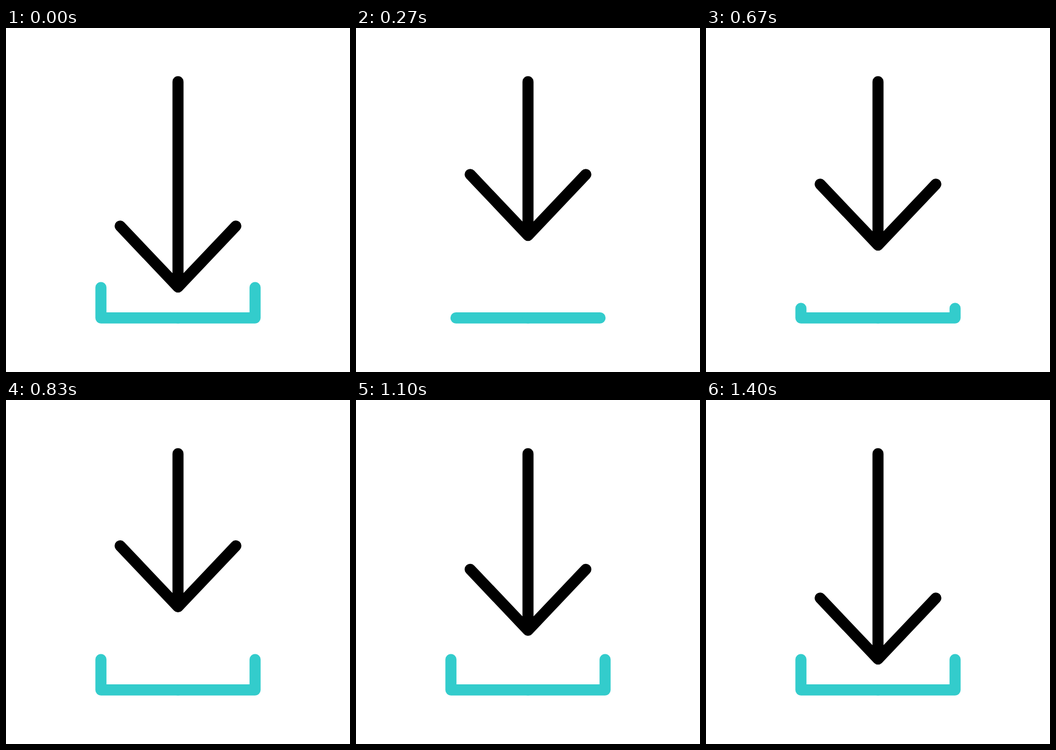
Write an HTML page that moves like this. It is 640 px wide and 640 px high and loops after 2000 ms.

```html
<!DOCTYPE html>
<html lang="en">
<head>
<meta charset="utf-8">
<title>Download</title>
<style>
  html, body { margin: 0; height: 100%; overflow: hidden; background: #fff; }
  svg { display: block; width: 100%; height: 100%; }
  path { fill: none; stroke: #000; stroke-width: 20.6; stroke-linecap: round; stroke-linejoin: round; }
  #tray path { stroke: #33cccc; }
</style>
</head>
<body>
<svg viewBox="0 0 640 640">
  <g id="tray">
    <path d="M320 539.4H176.6V482.7"/>
    <path d="M320 539.4H463.4V482.7"/>
  </g>
  <path id="arrow"/>
</svg>
<script>
const LOOP = 2000, FPS = 30;
const TOP = 99.9, REST = 481.9, LIFT = 266, HALF_TRAY = 200.1;
const PEAK = 16, LAND = 21, BOUNCE = 34.8, END = 42;
const tray = document.getElementById('tray');
const arrow = document.getElementById('arrow');

// Steady start with a sharp acceleration at the end
const rise = (u, steady, power) => steady * u + (1 - steady) * u ** power;

const hop = (f, from, to, height) => {
  const u = (f - from) / (to - from);
  return 4 * height * u * (1 - u);
};

function lift(f) {
  if (f <= PEAK) return LIFT * rise(f / PEAK, 0.72, 8);
  if (f <= LAND) return LIFT * (1 - ((f - PEAK) / (LAND - PEAK)) ** 1.554);
  if (f <= BOUNCE) return hop(f, LAND, BOUNCE, 118);
  return f < END ? hop(f, BOUNCE, END, 79) : 0;
}

function trayShare(f) {
  if (f <= PEAK) return 1 - rise(f / PEAK, 0.66, 11.4);
  return f < LAND ? ((f - PEAK) / (LAND - PEAK)) ** 0.97 : 1;
}

function draw(now) {
  const f = Math.floor((now % LOOP + 5) * FPS / 1000);
  const tip = REST - lift(f);
  const share = trayShare(f);
  arrow.setAttribute('d', `M320 ${TOP}V${tip}M212.4 ${tip - 113.4}L320 ${tip}L427.6 ${tip - 113.4}`);
  tray.style.visibility = share > 0.001 ? 'visible' : 'hidden';
  tray.style.strokeDasharray = share < 1 ? `${share * HALF_TRAY} 999` : 'none';
}

const start = performance.now();
function tick() {
  draw(performance.now() - start);
  requestAnimationFrame(tick);
}
tick();
</script>
</body>
</html>
```
